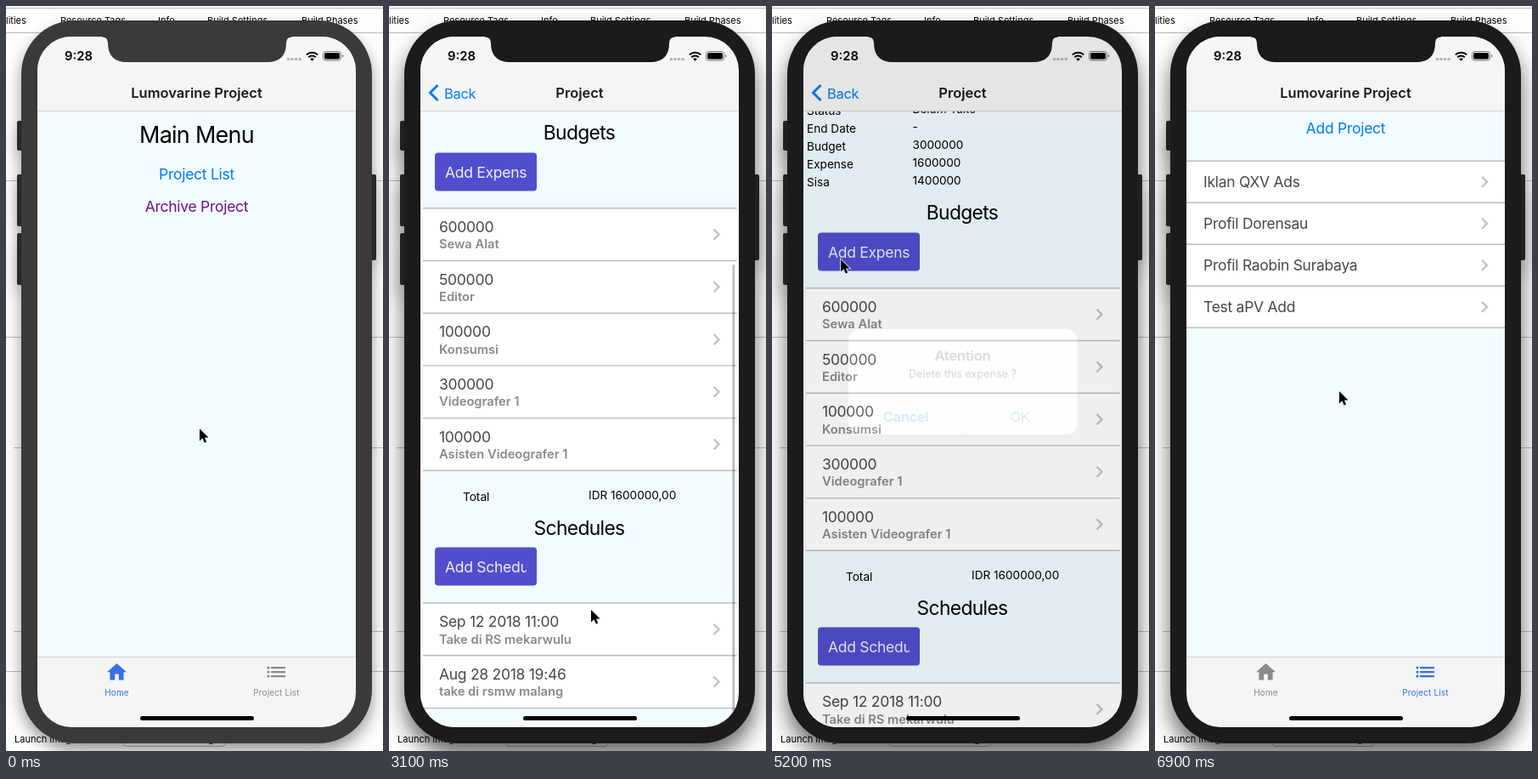
An HTML page for the animation above (7000 ms loop, 444 px wide and 876 px high).

```html
<!DOCTYPE html>
<html lang="en">
<head>
<meta charset="utf-8">
<title>Project app</title>
<style>
html, body { margin: 0; width: 100%; height: 100%; overflow: hidden; background: #fff; }
svg { display: block; }
#stage { width: 100vw; height: 100vh; }
text { font-family: Inter, Roboto, sans-serif; font-optical-sizing: none; dominant-baseline: central; }
.mid { text-anchor: middle; }
.h1 { font-size: 27px; letter-spacing: -.028em; }
.h2 { font-size: 22.8px; letter-spacing: -.028em; }
.item { font-size: 17.5px; letter-spacing: -.016em; }
.sub { font-size: 14.7px; font-weight: 600; fill: #86898f; }
.body { font-size: 13.6px; }
.id { font-size: 13.8px; font-weight: 700; letter-spacing: .2px; }
.nav { font-size: 16.5px; font-weight: 600; fill: #1a1a1a; }
.btn { font-size: 16.5px; letter-spacing: -.02em; }
.note { font-size: 12.6px; }
.tab { font-size: 10px; letter-spacing: .015em; }
.ide { font-size: 11px; }
.dim { fill: #43484d; }
.blue { fill: #007aff; }

.anim, .anim * { animation-duration: 7s; animation-iteration-count: infinite; animation-timing-function: linear; }
#stage .step { animation-timing-function: step-end; }
.shell { animation-name: shell; }
.case { animation-name: case; }
.side { animation-name: side; }
.home { animation-name: home; }
.list { animation-name: list; }
.tabA { animation-name: tabA; }
.tabB { animation-name: tabB; }
.base { animation-name: base; }
.page { animation-name: page; }
.title1 { animation-name: title1; }
.title2 { animation-name: title2; }
.scroll { animation-name: scroll; }
.thumb { animation-name: thumb; }
.thumb rect { animation-name: glow; }
.alert { animation-name: alert; }
.box { animation-name: box; transform-origin: 224.5px 442px; }
.msg1 { animation-name: msg1; }
.msg2 { animation-name: msg2; }
.cursor { animation-name: cursor; }

@keyframes shell {
  0% { filter: drop-shadow(0 9px 9px rgba(0,0,0,.4)); }
  12.86%, 100% { filter: drop-shadow(0 15px 13px rgba(0,0,0,.58)); }
}
@keyframes case { 0% { fill: #3a3a3a; } 12.86%, 100% { fill: #1b1b1b; } }
@keyframes side { 0% { fill: #292929; } 12.86%, 100% { fill: #212121; } }
@keyframes home { 0% { opacity: 1; } 15.71%, 100% { opacity: 0; } }
@keyframes list { 0% { opacity: 0; } 15.71%, 100% { opacity: 1; } }
@keyframes tabA { 0% { fill: #3570e8; } 15.71%, 100% { fill: #8a8a8d; } }
@keyframes tabB { 0% { fill: #8a8a8d; } 15.71%, 100% { fill: #3570e8; } }
@keyframes base {
  0% { transform: none; }
  24.29% { transform: none; animation-timing-function: cubic-bezier(.283,.99,.318,.99); }
  31.43% { transform: translateX(-112px); }
  92.14% { transform: translateX(-112px); animation-timing-function: cubic-bezier(.283,.99,.318,.99); }
  98.57%, 100% { transform: none; }
}
@keyframes page {
  0% { transform: translateX(376px); }
  24.29% { transform: translateX(376px); animation-timing-function: cubic-bezier(.283,.99,.318,.99); }
  31.43% { transform: none; }
  92.14% { transform: none; animation-timing-function: cubic-bezier(.283,.99,.318,.99); }
  98.57%, 100% { transform: translateX(376px); }
}
@keyframes title1 {
  0%, 24.29% { opacity: 1; transform: none; animation-timing-function: ease-out; }
  28.5%, 92.14% { opacity: 0; transform: translateX(-90px); animation-timing-function: ease-out; }
  97%, 100% { opacity: 1; transform: none; }
}
@keyframes title2 {
  0%, 24.29% { opacity: 0; transform: translateX(120px); animation-timing-function: ease-out; }
  28.5%, 92.14% { opacity: 1; transform: none; animation-timing-function: ease-out; }
  97%, 100% { opacity: 0; transform: translateX(120px); }
}
@keyframes scroll {
  0% { transform: none; }
  35.71% { transform: none; animation-timing-function: cubic-bezier(.3,.5,.3,1); }
  42.86% { transform: translateY(-242px); }
  62.14% { transform: translateY(-242px); animation-timing-function: ease-out; }
  65.71% { transform: translateY(-148px); }
  80% { transform: translateY(-148px); animation-timing-function: cubic-bezier(.3,.4,.4,.95); }
  88.57% { transform: translateY(-9px); }
  90.71%, 100% { transform: none; }
}
@keyframes thumb {
  0% { transform: none; }
  35.71% { transform: none; animation-timing-function: cubic-bezier(.3,.5,.3,1); }
  42.86% { transform: translateY(178px); }
  62.14% { transform: translateY(178px); animation-timing-function: ease-out; }
  65.71% { transform: translateY(110px); }
  80% { transform: translateY(110px); animation-timing-function: cubic-bezier(.3,.4,.4,.95); }
  88.57% { transform: translateY(4px); }
  90.71%, 100% { transform: none; }
}
@keyframes glow {
  0%, 35% { opacity: 0; }
  36.5%, 43.5% { opacity: .4; }
  46%, 62% { opacity: 0; }
  63%, 66% { opacity: .4; }
  69%, 80% { opacity: 0; }
  81.5%, 91% { opacity: .4; }
  93%, 100% { opacity: 0; }
}
@keyframes alert {
  0%, 50% { opacity: 0; }
  53.57%, 58.57% { opacity: 1; }
  62.14%, 66.43% { opacity: 0; }
  69.29%, 71.43% { opacity: 1; }
  74.86%, 100% { opacity: 0; }
}
@keyframes box {
  0%, 50% { transform: scale(1.2); animation-timing-function: ease-out; }
  53.57%, 62.5% { transform: none; }
  62.6%, 66.43% { transform: scale(1.2); animation-timing-function: ease-out; }
  69.29%, 75.5% { transform: none; }
  75.6%, 100% { transform: scale(1.2); }
}
@keyframes msg1 { 0% { opacity: 1; } 64.3%, 100% { opacity: 0; } }
@keyframes msg2 { 0% { opacity: 0; } 64.3%, 100% { opacity: 1; } }
@keyframes cursor {
  0%, 2.86% { transform: translate(228px,497px); animation-timing-function: ease-in-out; }
  10%, 15.71% { transform: translate(225px,198px); animation-timing-function: ease-in-out; }
  21.5%, 24.29% { transform: translate(262px,302px); animation-timing-function: ease-in-out; }
  30%, 35.71% { transform: translate(298px,381px); animation-timing-function: ease-in-out; }
  44.29% { transform: translate(238px,710px); }
  47.14%, 51.43% { transform: translate(235px,727px); animation-timing-function: ease-in-out; }
  56.43%, 58.57% { transform: translate(163px,475px); }
  62.14%, 66.43% { transform: translate(150px,356px); animation-timing-function: ease-in-out; }
  70%, 71.43% { transform: translate(157px,478px); animation-timing-function: ease-out; }
  74.29%, 76% { transform: translate(81px,298px); animation-timing-function: ease-in-out; }
  82%, 88.57% { transform: translate(230px,318px); animation-timing-function: ease-in-out; }
  91.5%, 92.6% { transform: translate(79px,100px); animation-timing-function: ease-out; }
  98.57%, 100% { transform: translate(217px,453px); }
}
</style>
</head>
<body>
<svg id="stage" class="anim" viewBox="0 0 444 876">
  <defs>
    <clipPath id="glass"><rect x="37" y="36" width="375" height="812" rx="40"/></clipPath>
  </defs>

  <g id="ide">
    <rect width="444" height="876" fill="#fefefe"/>
    <path d="M0 2.5H444M0 31.5H444M0 205.5H444M0 389.5H444M9 519.5H444M9 735.5H444M0 782.5H444" stroke="#b9b9b9" fill="none"/>
    <rect x="138.500" y="851.500" width="119" height="19" rx="3" fill="#fff" stroke="#b5b5b5"/>
  </g>

  <g class="shell step">
    <g class="side step">
      <rect x="13" y="135" width="8" height="35" rx="2"/>
      <rect x="13" y="198" width="8" height="61" rx="2"/>
      <rect x="13" y="267" width="8" height="61" rx="2"/>
      <rect x="428" y="198" width="8" height="101" rx="2"/>
    </g>
    <rect class="case step" x="18" y="17" width="413" height="850" rx="63"/>
  </g>

  <g clip-path="url(#glass)">
    <g class="base">
      <rect x="37" y="36" width="375" height="812" fill="#f2fbff"/>
      <g class="home step" id="home"></g>
      <g class="list step" id="list"></g>
      <rect x="37" y="765" width="375" height="83" fill="#f5f5f5"/>
      <path d="M37 765.500H412" stroke="#cfd2d4"/>
      <g class="tabA step">
        <path transform="translate(116.700 769.500) scale(1.150)" d="M10 20v-6h4v6h5v-8h3L12 3 2 12h3v8z"/>
        <text class="tab mid" x="130.500" y="806.500">Home</text>
      </g>
      <g class="tabB step">
        <path d="M312 777h17v2.300h-17zM312 782h17v2.300h-17zM312 787h17v2.300h-17z"/>
        <circle cx="309" cy="778.100" r="1.600"/><circle cx="309" cy="783.100" r="1.600"/><circle cx="309" cy="788.100" r="1.600"/>
        <text class="tab mid" x="318.500" y="806.500">Project List</text>
      </g>
    </g>

    <g class="page">
      <rect x="37" y="124" width="375" height="724" fill="#f2fbff"/>
      <g class="scroll" id="detail"></g>
      <g class="thumb"><rect x="404.500" y="126" width="2.600" height="538" rx="1.300"/></g>
    </g>

    <rect x="37" y="36" width="375" height="88" fill="#f5f5f5"/>
    <path d="M37 123.500H412" stroke="#cfd2d4"/>
    <text class="nav mid title1" x="224.500" y="102">Lumovarine Project</text>
    <g class="title2">
      <text class="nav mid" x="224.500" y="102">Project</text>
    </g>
    <g class="page">
      <path d="M57.500 93L48.500 102L57.500 111" fill="none" stroke="#007aff" stroke-width="3"/>
      <text class="btn blue" x="65" y="102.500">Back</text>
    </g>

    <text x="69" y="59" font-size="14.800" font-weight="600">9:28</text>
    <g fill="#b4b4b6">
      <circle cx="332.500" cy="62.500" r="1.800"/><circle cx="337" cy="62.500" r="1.800"/><circle cx="341.600" cy="62.500" r="1.800"/><circle cx="346.200" cy="62.500" r="1.800"/>
    </g>
    <path d="M353.800 57.400a9.600 9.600 0 0 1 13.400 0M356.200 60.200a6 6 0 0 1 8.600 0" fill="none" stroke="#000" stroke-width="2"/>
    <path d="M358.200 62.400a3.300 3.300 0 0 1 4.600 0L360.500 64.800z"/>
    <rect x="373.500" y="53.500" width="21" height="10.500" rx="3" fill="none" stroke="#777"/>
    <rect x="375" y="55" width="18" height="7.500" rx="1.700"/>
    <path d="M396 57v3.600q1.500-.6 1.500-1.800t-1.500-1.800z" fill="#777"/>

    <g class="alert">
      <path d="M57.500 93L48.500 102L57.500 111" fill="none" stroke="#8a8a8a" stroke-width="3"/>
      <rect x="37" y="36" width="375" height="812" opacity=".4"/>
      <g class="box">
        <rect x="90" y="380" width="269.500" height="124" rx="13" fill="#f7f7f8"/>
        <path d="M90 460.500H359.500M224.500 460.500V504" stroke="#d4d4d8"/>
        <text class="nav mid" x="224.500" y="410.500" letter-spacing="-.2">Atention</text>
        <text class="note mid msg1 step" x="224.500" y="432">Delete this schedule ?</text>
        <text class="note mid msg2 step" x="224.500" y="432">Delete this expense ?</text>
        <text class="btn mid blue" x="157.500" y="483" font-weight="600">Cancel</text>
        <text class="btn mid blue" x="292" y="483">OK</text>
      </g>
    </g>
    <rect x="158" y="835" width="134" height="5" rx="2.500"/>
  </g>

  <path class="case step" d="M113 35v1.500q7 0 7 7q0 22.500 22.500 22.500h165q22.500 0 22.500-22.500q0-7 7-7v-1.500z"/>

  <g class="cursor">
    <path d="M0 0V14.500L3.400 11.300L5.700 16.500L8.200 15.400L6 10.400H10.600Z" stroke="#fff" stroke-width="1.500" paint-order="stroke"/>
  </g>
</svg>

<script>
const $ = id => document.getElementById(id);
const text = (x, y, cls, str, more = '') => `<text x="${x}" y="${y}" class="${cls}" ${more}>${str}</text>`;
const line = (x1, x2, y) => `<path d="M${x1} ${y}H${x2}" stroke="#bbbcc2" stroke-width="1.4"/>`;
const chevron = (x, y) =>
  `<path d="M${x} ${y - 6}l6 6l-6 6" fill="none" stroke="#c2c3c8" stroke-width="2.4"/>`;

// Rows are [title, subtitle]; a row without subtitle is centred.
function table(x1, x2, top, step, textX, chevX, rows) {
  const bottom = top + step * rows.length;
  let out = `<rect x="${x1}" y="${top}" width="${x2 - x1}" height="${bottom - top}" fill="#fff"/>` + line(x1, x2, top);
  rows.forEach(([title, sub], i) => {
    const y = top + step * i;
    out += text(textX, y + (sub ? 21.5 : step / 2), 'item dim', title) +
      (sub ? text(textX, y + 42.5, 'sub', sub) : '') +
      chevron(chevX, y + step / 2) + line(x1, x2, y + step);
  });
  return out;
}

const button = (y, label) =>
  `<rect x="54" y="${y}" width="120" height="45" rx="4" fill="#514ecd"/>
   <svg x="66" y="${y}" width="96" height="45">${text(0, 22.5, 'item', label, 'fill="#eef"')}</svg>`;

$('ide').innerHTML += [
  [0, 17, 'lities'], [64, 17, 'Resource Tags'], [179, 17, 'Info'],
  [237, 17, 'Build Settings'], [348, 17, 'Build Phases'],
  [10, 862, 'Launch Images Source'], [149, 862, 'Use Asset Catalog']
].map(([x, y, s]) => text(x, y, 'ide', s)).join('');

$('home').innerHTML =
  text(224.5, 151, 'h1 mid', 'Main Menu') +
  text(224.5, 197, 'item mid blue', 'Project List') +
  text(224.5, 235, 'item mid', 'Archive Project', 'fill="#70117f"');

$('list').innerHTML =
  text(224.5, 143, 'item mid blue', 'Add Project') +
  table(37, 412, 182.3, 49, 57, 385, [
    ['Iklan QXV Ads'], ['Profil Dorensau'], ['Profil Raobin Surabaya'], ['Test aPV Add']
  ]);

const fields = [
  ['Description', 'Profil Raobin Surabaya'], ['Start Date', ''], ['Status', 'Belum Take'],
  ['End Date', '-'], ['Budget', '3000000'], ['Expense', '1600000'], ['Sisa', '1400000']
];

$('detail').innerHTML =
  text(224, 160.5, 'h2 mid', 'Profil Raobin Surabaya') +
  text(41, 195, 'body', 'Project ID') +
  text(165.5, 193, 'id', 'ddb24d29-') +
  text(165.5, 210, 'id', 'b0ad-5621-991c-4d0398c95428') +
  fields.map(([label, value], i) =>
    text(41, 229 + 21 * i, 'body', label) + text(165.5, 227 + 21 * i, 'body', value)).join('') +
  text(224, 390, 'h2 mid', 'Budgets') +
  button(414.5, 'Add Expense') +
  table(40, 409.5, 479.8, 61.7, 59, 382.5, [
    ['600000', 'Sewa Alat'], ['500000', 'Editor'], ['100000', 'Konsumsi'],
    ['300000', 'Videografer 1'], ['100000', 'Asisten Videografer 1']
  ]) +
  text(87, 819, 'body', 'Total') +
  text(235, 817, 'body', 'IDR 1600000,00') +
  text(224, 855, 'h2 mid', 'Schedules') +
  button(878.5, 'Add Schedule') +
  table(40, 409.5, 944, 61.8, 59, 382.5, [
    ['Sep 12 2018 11:00', 'Take di RS mekarwulu'], ['Aug 28 2018 19:46', 'take di rsmw malang']
  ]);
</script>
</body>
</html>
```
